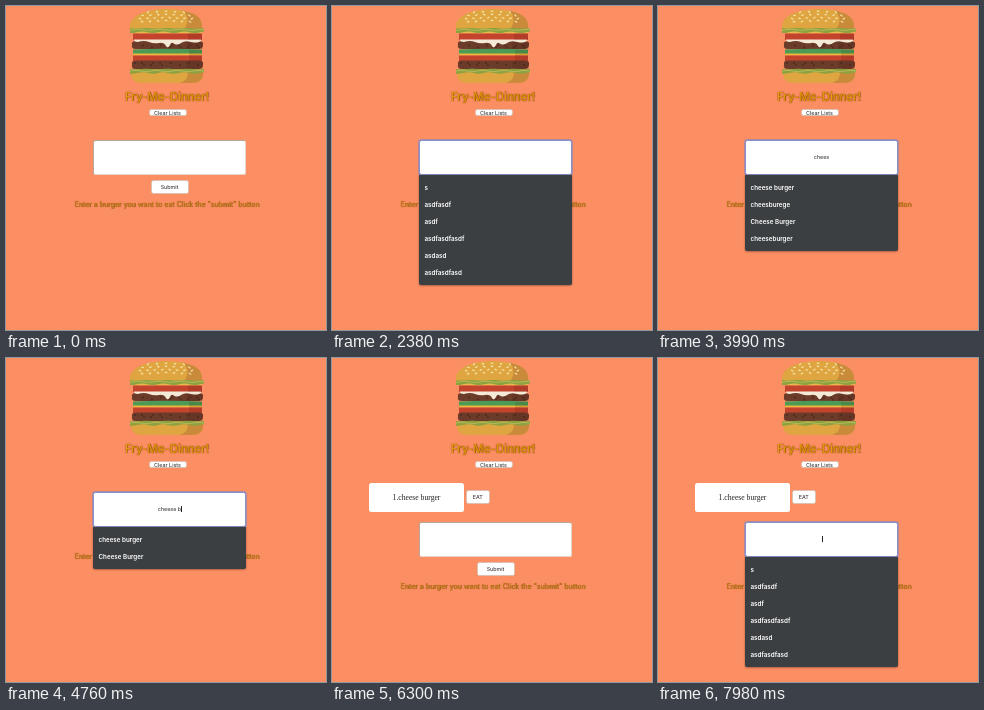
Animation, 320 px wide and 324 px high, one loop 8 s. Source, as an HTML page:

```html
<!DOCTYPE html>
<html lang="en">
<head>
<meta charset="utf-8">
<title>Burger list</title>
<style>
html, body { margin: 0; width: 100%; height: 100%; overflow: hidden; background: #fc8e63; }
body { position: relative; font: 5.4px Inter, sans-serif; color: #222; }
body * { box-sizing: border-box; }
svg, .box, .head, #form, #menu { position: absolute; }
svg { left: -1px; top: -.5px; }
.box { display: flex; align-items: center; justify-content: center; background: #fff; white-space: pre; border-radius: 2.5px; }
.btn { border: .5px solid #dcc0b2; }
.head { left: 0; width: 322px; text-align: center; white-space: nowrap; }
#title { top: 83px; font-size: 11.4px; line-height: 16px; font-weight: 500; color: #e8960c; text-shadow: 0 0 1.2px #7a4600, .4px .4px .8px #7a4600; }
#hint { top: 193px; font-size: 7.03px; line-height: 11px; color: #cf7f1c; text-shadow: 0 0 1px #8a5a14, .3px .3px .6px #8a5a14; }
#form { left: 0; top: 0; width: 320px; height: 324px; }
#input { left: 87px; top: 134px; width: 153px; height: 34.5px; border: 1px solid #e6d3ca; border-top-color: #b9a79e; border-left-color: #b9a79e; border-radius: 2.5px; }
#input.focus { border-color: #8a90c8; box-shadow: 0 0 0 .7px #8f88b8; }
#caret { width: .6px; height: 6px; margin-right: -.6px; background: #222; }
#menu { left: 87px; top: 169px; width: 153px; padding-top: 4.5px; background: #3b3f42; border-radius: 0 0 2px 2px; box-shadow: 0 .5px 2px #0007; color: #fff; font-size: 6.25px; font-weight: 600; overflow: hidden; }
#menu div { height: 17px; line-height: 17px; padding-left: 5.5px; }
#item { font: 7.65px "Liberation Serif", serif; }
</style>
</head>
<body>
<svg width="320" height="120">
  <path d="M125 23C123 9 142 3 162 3S199 9 197 23Z" fill="#dea540"/>
  <path d="M178 4.5C194 8 198 14 197 23H179C184 17 184 10 178 4.5Z" fill="#c98a3a"/>
  <g id="seeds" fill="#f3dfa0"/>
  <rect x="128" y="25" width="69" height="2.5" fill="#e9b94d"/>
  <rect x="128" y="27.5" width="69" height="6.5" fill="#c4432d"/>
  <path id="leafTop" fill="#8da23f"/>
  <path d="M127 39Q126 35 131 35H193Q199 35 198 39Q198 43 193 43H131Q126 43 127 39Z" fill="#6b3c2a"/>
  <path d="M129 33.5H196V35Q192 38 186 36T176 37Q172 40 168 37Q166 36 165 39Q163 43 161 40Q159 36 154 37T144 36T133 36Q129 36 129 33.5Z" fill="#f5ead8"/>
  <path d="M128 43.5Q162 42 197 43.5V48H128Z" fill="#4b9a55"/>
  <rect x="128" y="47.5" width="69" height="2" fill="#eeb83c"/>
  <rect x="128" y="49.5" width="69" height="5.5" fill="#c4432d"/>
  <path d="M127 58.5Q126 54.5 131 54.5H193Q199 54.5 198 58.5Q198 63 193 63H131Q126 63 127 58.5Z" fill="#6b3c2a"/>
  <g id="crumbs" fill="#4f2a20"/>
  <path d="M126 65H198Q199 77 187 77H137Q125 77 126 65Z" fill="#dea540"/>
  <path d="M183 65H198Q199 77 187 77H175Q184 74 183 65Z" fill="#c98a3a"/>
  <path id="leafLow" fill="#8da23f"/>
  <g fill="none" stroke="#b3b95a"><path id="veinTop"/><path id="veinLow"/></g>
  <path d="M183 27.5H197V34H183ZM181 36H198V43H181ZM184 43.5H197V55H184ZM181 55H198V63H181Z" fill="#3a1008" opacity=".13"/>
</svg>
<div class="head" id="title">Fry-Me-Dinner!</div>
<div class="box btn" style="left:142.5px;top:103px;width:38px;height:7px">Clear Lists</div>
<div id="list">
  <div class="box" id="item" style="left:37px;top:125px;width:95px;height:28.5px">1.cheese burger</div>
  <div class="box btn" style="left:134px;top:132px;width:23.5px;height:14px">EAT</div>
</div>
<div id="form">
  <div class="head" id="hint">Enter a burger you want to eat Click the "submit" button</div>
  <div class="box btn" style="left:144.5px;top:173.5px;width:38px;height:14px">Submit</div>
  <div class="box" id="input"><span id="typed"></span><i id="caret"></i></div>
  <div id="menu"></div>
</div>
<script>
const $ = id => document.getElementById(id);
const LOOP = 8000, FOCUS = 1820, CLOSE = 6230, SUBMIT = 6300, REFOCUS = 7350;
const phrase = 'cheese burger';
const keyTimes = [2520, 2800, 3080, 3220, 3490, 4130, 4480, 4760, 4900, 5040, 5110, 5250, 5320];
const recent = ['s', 'asdfasdf', 'asdf', 'asdfasdfasdf', 'asdasd', 'asdfasdfasd'];
const burgers = ['cheese burger', 'cheesburege', 'Cheese Burger', 'cheeseburger'];

function drawBurger() {
  let seeds = '', crumbs = '';
  [[5.3, 5, 9], [8.3, 7, 7.8], [11.4, 8, 7.4], [14.5, 7, 8]].forEach(([y, n, gap], row) => {
    for (let i = 0; i < n; i++) {
      const x = 161 + (i - (n - 1) / 2) * gap, tilt = (i * 67 + row * 41) % 90 - 45;
      const cy = y + Math.abs(x - 161) * .05;
      seeds += `<ellipse cx="${x}" cy="${cy}" rx="1.5" ry=".75" transform="rotate(${tilt} ${x} ${cy})"/>`;
    }
  });
  for (let i = 0; i < 22; i++) {
    const x = 130 + i * 37 % 65, y = (i % 2 ? 38.5 : 57) + i * 5 % 4;
    crumbs += `<circle cx="${x}" cy="${y}" r="1"/>`;
  }
  $('seeds').innerHTML = seeds;
  $('crumbs').innerHTML = crumbs;

  const wave = (y, amp, phase) => Array.from({length: 38}, (_, i) =>
    `${125 + i * 2},${(y + amp * Math.sin(i * .6 + phase)).toFixed(1)}`);
  const leaf = y => 'M' + wave(y, .3, 0).join('L') + 'L' + wave(y + 4, .8, 1).reverse().join('L') + 'Z';
  $('leafTop').setAttribute('d', leaf(22.3));
  $('leafLow').setAttribute('d', leaf(63));
  $('veinTop').setAttribute('d', 'M' + wave(23.8, .5, 2).join('L'));
  $('veinLow').setAttribute('d', 'M' + wave(65, .6, 3).join('L'));
}

let shown = '';
function setMenu(rows) {
  const key = rows.join();
  if (key === shown) return;
  shown = key;
  $('menu').innerHTML = rows.map(r => `<div>${r}</div>`).join('');
  $('menu').style.height = rows.length * 17 + 8 + 'px';
}

function draw() {
  const t = performance.now() % LOOP;
  const sent = t >= SUBMIT;
  const focused = sent ? t >= REFOCUS : t >= FOCUS;
  const pressed = keyTimes.filter(k => k <= t);
  const typed = sent ? '' : phrase.slice(0, pressed.length);
  const lastKey = Math.max(FOCUS, ...pressed);
  const blinkOn = sent || (t - lastKey) % 1000 < 500;
  const open = focused && (sent || t < CLOSE);

  $('list').hidden = !sent;
  $('form').style.top = sent ? '30px' : 0;
  $('input').classList.toggle('focus', focused);
  $('typed').textContent = typed;
  $('caret').style.opacity = focused && blinkOn ? 1 : 0;
  $('menu').style.display = open ? 'block' : 'none';
  setMenu(typed ? burgers.filter(b => b.toLowerCase().startsWith(typed)) : recent);
  requestAnimationFrame(draw);
}

drawBurger();
draw();
</script>
</body>
</html>
```
